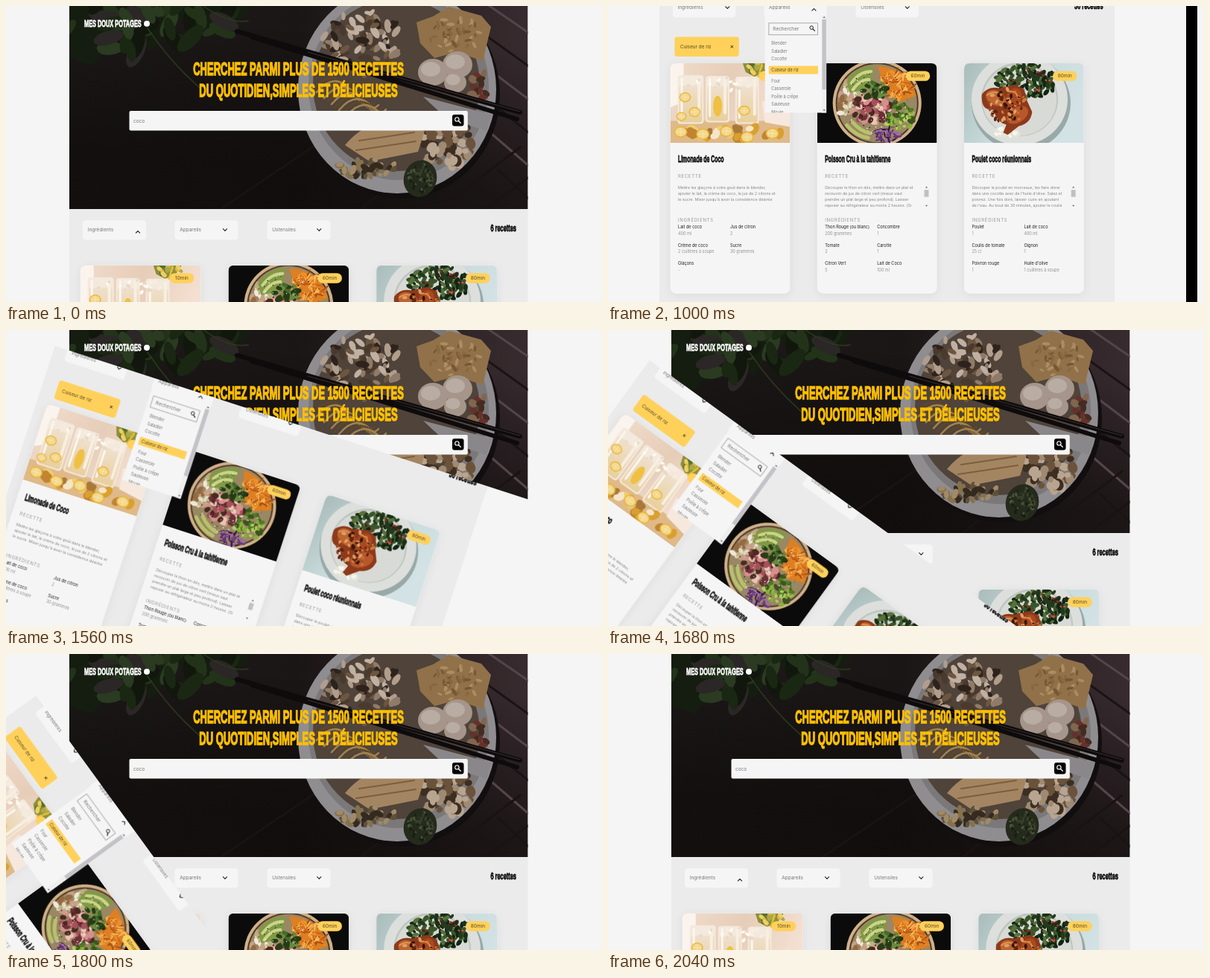
Recreate the animation shown at these times as an HTML page. Size 800 px wide and 398 px high, loop 2.1 s.

```html
<!DOCTYPE html>
<html lang="fr">
<head>
<meta charset="utf-8">
<title>Recettes</title>
<style>
  html, body { margin: 0; width: 100%; height: 100%; overflow: hidden; background: #f5f5f5; }
  #stage { display: block; width: 100vw; height: 100vh; }
  text { font-family: Inter, "Open Sans", sans-serif; white-space: pre; }
  .display { font-family: "Liberation Sans", sans-serif; font-weight: 700; stroke: currentColor; stroke-width: .06em; }
  .light { font-weight: 300; }
  .card { filter: drop-shadow(0 2px 6px #00000010); }
  .line { fill: none; stroke-linecap: round; stroke-linejoin: round; }

  .list, .sheet, .strip { animation: 2100ms step-end infinite; }
  .list { animation-name: showList; }
  .sheet { animation-name: showSheet, swing; }
  .strip { animation-name: showStrip; }
  @keyframes showList {
    0%, 100% { visibility: hidden; }
    23.809% { visibility: visible; }
    47.619% { visibility: hidden; }
  }
  @keyframes showSheet {
    0% { visibility: hidden; }
    47.619%, 100% { visibility: visible; }
  }
  @keyframes showStrip {
    0% { opacity: 1; }
    71.428%, 100% { opacity: 0; }
  }
  /* The sheet swings about its top left corner, 9 degrees every 60 ms. */
  @keyframes swing {
    0% { transform: rotate(0deg); }
    71.428% { transform: rotate(9deg); animation-timing-function: steps(10, end); }
    100% { transform: rotate(99deg); }
  }
</style>
</head>
<body>
<svg id="stage" viewBox="0 0 800 398"></svg>
<script>
const YELLOW = '#ffd15b', PAPER = '#f5f5f5', INK = '#1b1b1b', GREY = '#777';

let seed = 7;
const random = () => (seed = seed * 16807 % 2147483647) / 2147483647;

const text = (str, x, y, size, fill = GREY, attrs = '') =>
  `<text x="${x}" y="${y}" font-size="${size}" fill="${fill}" ${attrs}>${str}</text>`;
const display = (str, x, y, size, fill = '#111', anchor = 'start') =>
  `<text class="display" transform="translate(${x} ${y}) scale(.55 1)" font-size="${size}" fill="${fill}" color="${fill}" text-anchor="${anchor}">${str}</text>`;
const rect = (x, y, w, h, fill, r = 0, attrs = '') =>
  `<rect x="${x}" y="${y}" width="${w}" height="${h}" rx="${r}" fill="${fill}" ${attrs}/>`;
const oval = (x, y, rx, ry, fill, turn = 0) =>
  `<ellipse rx="${rx}" ry="${ry}" fill="${fill}" transform="translate(${x} ${y}) rotate(${turn})"/>`;
const shape = (d, fill) => `<path d="${d}" fill="${fill}"/>`;
const line = (d, stroke, width = 1) =>
  `<path class="line" d="${d}" stroke="${stroke}" stroke-width="${width}"/>`;
const at = (x, y, body, scale = 1) => `<g transform="translate(${x} ${y}) scale(${scale})">${body}</g>`;

// Small pieces strewn inside an ellipse.
const strew = (n, cx, cy, rx, ry, size, colors, slim = .6) =>
  Array.from({ length: n }, (_, i) => {
    const a = random() * 2 * Math.PI, d = Math.sqrt(random()), s = size * (.6 + .6 * random());
    return oval((cx + rx * d * Math.cos(a)).toFixed(1), (cy + ry * d * Math.sin(a)).toFixed(1),
      s.toFixed(1), (s * slim).toFixed(1), colors[i % colors.length], Math.round(random() * 180));
  }).join('');

const lens = (x, y, color, s = 1) => at(x, y,
  `<circle cx="-.8" cy="-.8" r="2.3" fill="none" stroke="${color}" stroke-width="1"/>` +
  line('M1 1L3.4 3.4', color, 1.2), s);
const chevron = (x, up) => at(x, up ? 30.8 : 28, line(up ? 'M-2.6 1.3L0-1.3 2.6 1.3' : 'M-2.6-1.3L0 1.3 2.6-1.3', '#222', 1.1));
const arrow = (x, y, dir) => shape(`M${x - 1.6} ${y + dir}h3.2l-1.6${dir > 0 ? '-' : ' '}2z`, '#666');

const glass = (x, y, w, h) =>
  rect(x, y, w, h, '#f3e9dc', 4) + rect(x + 2, y + 14, w - 4, h - 16, 'url(#drink)', 3) +
  rect(x + 4, y + 3, 3, h - 10, '#fbf6ee', 1.5) + rect(x + w - 8, y + 3, 4, h - 14, '#f8efe2', 2);
const slice = (x, y, r) => oval(x, y, r, r * .85, '#e9b53c') + oval(x, y, r * .82, r * .68, '#f3d88c') +
  line(`M${x - r * .6} ${y}h${r * 1.2}M${x} ${y - r * .5}v${r}`, '#f9e9bd', .7);

const lemonade = () =>
  rect(0, 0, 162, 108, 'url(#cream)') + shape('M0 0H18V52L0 60z', '#fbf4ee') +
  rect(0, 78, 162, 30, '#dfb988') +
  shape('M98 0H136L128 12 114 18 102 12z', '#8a8f3c') + strew(16, 118, 7, 17, 8, 5, ['#a9a84a', '#55702c', '#e2b93f', '#efcf62']) +
  line('M112 40L124 2', '#efbd30', 2.2) +
  glass(10, 16, 35, 66) + glass(48, 17, 32, 63) + glass(88, 18, 32, 64) +
  oval(64, 58, 6, 14, '#efc042') + slice(20, 46, 8) + slice(33, 66, 8) + slice(100, 64, 8) + slice(15, 72, 7) +
  strew(24, 63, 28, 52, 9, 3.5, ['#fffaf3', '#e9d9c8', '#f7ece0']) +
  strew(26, 80, 97, 78, 9, 8, ['#d99f2f', '#c18430', '#f0cd6b', '#f6e6c8', '#a9793a'], .7) +
  [[14, 93], [44, 96], [76, 92], [104, 100], [138, 95]].map(([x, y]) => slice(x, y, 9)).join('') +
  shape('M124 52Q146 44 162 56V86L128 80z', '#f6e8dc');

const fishBowl = () =>
  rect(0, 0, 162, 108, '#0c0b0b') + oval(81, 54, 60, 59, '#d0b188') + oval(81, 54, 56, 55, '#4d3b2b') +
  oval(81, 54, 54, 53, '#9a8763') +
  strew(45, 44, 52, 16, 28, 5, ['#e2d6bd', '#c79f86', '#f0e7d6', '#96693f', '#b7b481']) +
  shape('M40 24Q54 4 76 4L72 34 44 40z', '#7f9a45') + line('M46 27Q57 11 73 11M48 36Q58 22 70 22', '#cdd38a', 4) +
  shape('M82 4Q124 6 134 44L112 52 92 38z', '#dd7f22') + strew(75, 109, 29, 24, 20, 5, ['#f3a13a', '#cf6517', '#f7b95a', '#a84d12'], .2) +
  strew(60, 112, 72, 20, 20, 4, ['#86b03a', '#b0d060', '#527a26', '#39551c'], .65) +
  strew(60, 74, 62, 26, 20, 5, ['#a8505a', '#d88f8c', '#6f2f38', '#ecc3b6', '#4a2a22'], .75) +
  strew(35, 92, 97, 20, 9, 5, ['#673382', '#9b64ac', '#38193f'], .25) +
  line('M40 84Q53 99 69 101M48 80Q58 92 72 95', '#b6c269', 5) +
  strew(24, 76, 36, 17, 11, 6, ['#476b2b', '#223d18', '#2b3b17', '#6a8a3f']) +
  strew(110, 80, 54, 45, 44, .9, ['#f8f1df', '#1b1713'], .7);

const chicken = () =>
  rect(0, 0, 162, 108, 'url(#cloth)') + oval(77, 54, 67, 65, '#98a9a8') + oval(75, 49, 65, 62, '#dcdfdb') +
  oval(75, 49, 52, 50, '#bfc6c2') + oval(75, 50, 50, 48, '#d8dad5') +
  strew(120, 84, 24, 40, 23, 5, ['#23391d', '#39552a', '#122414', '#56713a', '#1b2f18'], .55) +
  strew(24, 84, 24, 36, 19, 2, ['#9c2a22', '#c9583c']) +
  strew(28, 58, 94, 15, 8, 4, ['#f7f6ef', '#e6e4d8']) +
  shape('M24 42Q33 30 48 34L68 29Q84 33 84 48L92 66Q90 82 74 85L59 97 53 94 57 83Q43 79 40 63 22 65 24 42z', '#8c3a1b') +
  oval(43, 47, 14, 10, '#bd6430', 25) + oval(67, 47, 10, 14, '#a8491e', 25) + oval(72, 70, 16, 10, '#b8582a', -32) +
  line('M31 43Q40 36 49 42M61 38Q71 37 73 47', '#dd9455', 2) +
  strew(70, 58, 58, 26, 23, 3, ['#5c2212', '#d07a3c', '#35150d', '#a5441d', '#e0a066']);

const hero = () =>
  rect(85, 0, 615.5, 273, 'url(#table)') + rect(85, 0, 615.5, 273, 'url(#dusk)') +
  [0, 1, 2, 3, 4, 5].map(i => line(`M${620 + i * 8} ${-20 + i * 48}L710 ${42 + i * 45}`, i % 2 ? '#1a1315' : '#54454a', 3)).join('') +
  line('M270 285L420 184M455 290L530 230M620 290L705 228M575 278L690 190', '#1a1214', 3) +
  shape('M85 0H330Q300 45 257 38L230 16 196 60 152 43 116 80 85 70z', '#151c10') +
  strew(46, 190, 22, 118, 40, 20, ['#1a2712', '#22331a', '#11170d', '#2a3b22', '#2b2726'], .45) +
  line('M190 30Q220 75 260 110M265 0Q300 25 325 20', '#2b391d', 1.5) +
  oval(530, 119, 133, 140, '#120e0f') + oval(525, 112, 133, 140, '#8f8d90') + oval(527, 108, 121, 126, '#7b787a') +
  oval(524, 106, 112, 116, '#4f433a') +
  strew(90, 478, 48, 52, 42, 8, ['#8f7b69', '#b09d8c', '#4a3a2d', '#6d563f', '#c0b0a2', '#2e231c'], .5) +
  Array.from({ length: 10 }, (_, i) => line(`M${412 + i * 5} ${112 + i * 4}q25-30 48 0t35 ${18 - i}`, i % 2 ? '#a08350' : '#5e4728', 2.5)).join('') +
  shape('M551 22L573 14 595 1 638 13 651 28 640 74 605 62 575 70 556 50z', '#917149') +
  strew(40, 602, 38, 34, 24, 5, ['#ac8d62', '#765834', '#88673f'], .4) +
  strew(14, 636, 107, 12, 18, 8, ['#68302a', '#81664f', '#452b20']) +
  shape('M560 122L652 146 645 168 590 150z', '#8a878a') +
  [[573, 89, 20], [606, 79, 20], [603, 103, 15]].map(([x, y, r]) => oval(x, y, r, r * .9, '#a5958a') + oval(x - 3, y - 4, r * .65, r * .5, '#b9aca2')).join('') +
  strew(70, 592, 184, 36, 32, 7, ['#a08a73', '#6b523a', '#b8a590', '#3d2e22'], .8) +
  shape('M455 187Q485 151 526 157L562 168 553 196 488 209z', '#a48562') + line('M470 194L550 182M474 181L548 170', '#7d5d3c', 2) +
  strew(40, 485, 218, 42, 12, 6, ['#5e5137', '#86714d', '#342a1e', '#a08a68']) +
  line('M310 34L690 143M330 42L686 152', '#0e0b0c', 6) + line('M405 62L690 142', '#39302f', 1) +
  oval(556, 232, 22, 25, '#252b1c', 20) + strew(60, 556, 231, 17, 20, 2.5, ['#4a5235', '#171d12', '#363f27']) +
  display('MES DOUX POTAGES', 105, 28.4, 13.4, '#fff') + oval(189, 23.7, 4, 4, '#fff') +
  display('CHERCHEZ PARMI PLUS DE 1500 RECETTES', 392.5, 93.4, 23.7, '#ffc000', 'middle') +
  display('DU QUOTIDIEN,SIMPLES ET DÉLICIEUSES', 392.5, 121.6, 23.7, '#ffc000', 'middle') +
  rect(165.5, 141, 454.3, 26.4, PAPER, 2) + text('coco', 171, 156.6, 6.5) +
  rect(599, 146, 15.5, 15.5, '#000', 3) + lens(606.3, 153.3, '#fff', 1.15);

const recipes = [
  { title: 'Limonade de Coco', time: '10min',
    steps: ['Mettre les glaçons à votre goût dans le blender,', 'ajouter le lait, la crème de coco, le jus de 2 citrons et', "le sucre. Mixer jusqu'à avoir la consistence désirée"],
    items: ['Lait de coco|400 ml', 'Jus de citron|2', 'Crème de coco|2 cuillères à soupe', 'Sucre|30 grammes', 'Glaçons|-'] },
  { title: 'Poisson Cru à la tahitienne', time: '60min',
    steps: ['Découper le thon en dés, mettre dans un plat et', 'recouvrir de jus de citron vert (mieux vaut', 'prendre un plat large et peu profond). Laisser', 'reposer au réfrigérateur au moins 2 heures. (Si'],
    items: ['Thon Rouge (ou blanc)|200 grammes', 'Concombre|1', 'Tomate|2', 'Carotte|1', 'Citron Vert|5', 'Lait de Coco|100 ml'] },
  { title: 'Poulet coco réunionnais', time: '80min',
    steps: ['Découper le poulet en morceaux, les faire dorer', "dans une cocotte avec de l'huile d'olive. Salez et", 'poivrez. Une fois doré, laisser cuire en ajoutant', "de l'eau. Au bout de 30 minutes, ajouter le coulis"],
    items: ['Poulet|1', 'Lait de coco|400 ml', 'Coulis de tomate|25 cl', 'Oignon|1', 'Poivron rouge|1', "Huile d'olive|1 cuillères à soupe"] },
];

const heading = (str, y) => text(str, 10.5, y, 6, GREY, 'class="light" letter-spacing=".8"');
const card = ({ title, time, steps, items }, i) =>
  rect(0, 0, 162, 312, PAPER, 8, 'class="card"') +
  `<g clip-path="url(#corners)"><use href="#photo${i}"/></g>` +
  rect(120, 10.5, 32.5, 13.5, YELLOW, 6.5) + text(time, 136.3, 19.6, 6.5, '#5a4a22', 'text-anchor="middle"') +
  display(title, 10.5, 133.8, 12.6) + heading('RECETTE', 155.5) +
  steps.map((s, n) => text(s, 10.5, 170.5 + n * 8, 5.4, '#666', 'class="light"')).join('') +
  (steps.length > 3 ? arrow(147.8, 168, .8) + rect(144.8, 171.5, 6, 9.5, '#c1c1c1') + arrow(147.8, 193, -.8) : '') +
  heading('INGRÉDIENTS', 215) +
  items.map((item, n) => {
    const [name, amount] = item.split('|'), x = n % 2 ? 81 : 10.5, y = 223.5 + (n >> 1) * 24.9;
    return text(name, x, y, 5.6, INK) + text(amount, x, y + 9, 5.6, GREY, 'class="light"');
  }).join('');

const menus = [['Ingrédients', 18, 92], ['Appareils', 141.5, 209], ['Ustensiles', 265.5, 335.3]];

function dropdown(x, { items, picked, thumb }) {
  let y = 37.4, last;
  const rows = items.map((item, n) => {
    const hit = picked.includes(item);
    if (n) y += hit || last ? 15 : 10.6;
    last = hit;
    return (hit ? rect(5.5, y - 5.5, 66.5, 11, YELLOW) : '') + text(item, 9, y + 2, 5.6, hit ? '#4d401f' : GREY);
  }).join('');
  return `<svg x="${x}" y="39" width="83.5" height="131.5">` + rect(0, 0, 83.5, 132, PAPER) +
    rect(5.5, 10, 66, 16, 'none', 0, 'stroke="#888" stroke-width=".7"') +
    text('Rechercher', 11, 20.4, 6.5) + lens(64, 17, '#222') + rows +
    rect(77, 0, 6.5, 132, '#eee') + arrow(80.3, 2.3, .8) + rect(77.5, 5, 5.5, thumb, '#c4c2c6') + arrow(80.3, 128, -.8) + '</svg>';
}

const tag = ([str, x, w]) => rect(x, 67.6, w, 26.8, YELLOW, 3.5) +
  text(str, x + 7.5, 83.4, 6.4, '#5a4a22') + at(x + w - 9.5, 81, line('M-1.4-1.4L1.4 1.4M1.4-1.4L-1.4 1.4', '#222', 1));

// Page origin: bottom left corner of the hero.
const page = ({ count, open, tags = [], list }) =>
  rect(0, 0, 615.5, 600, '#ebebeb') + '<use href="#hero" x="-85" y="-273"/>' +
  menus.map(([name, x, mark], i) => rect(x, 15.3, 85, 26, PAPER, 4) +
    text(name, x + 6.7, 30.4, 6.5, GREY) + chevron(mark, i === open)).join('') +
  display(`${count} recettes`, 600, 29.6, 13.5, '#111', 'end') + tags.map(tag).join('') +
  recipes.map((r, i) => at(14.7 + i * 198.7, tags.length ? 103.5 : 75.7, card(r, i))).join('') +
  (list ? dropdown(menus[open][1] + 1, list) : '');

const scene = (name, body) =>
  `<g class="${name}"><svg width="800" height="398">${rect(0, 0, 800, 398, PAPER)}${body}</svg></g>`;

const gradient = (id, dir, ...stops) => `<linearGradient id="${id}" ${dir}>` +
  stops.map((c, i) => `<stop offset="${i / (stops.length - 1)}" stop-color="${c}"/>`).join('') + '</linearGradient>';

document.getElementById('stage').innerHTML = '<defs>' +
  gradient('cream', 'x2="1" y2=".3"', '#f0dccb', '#e6cdb8', '#f4e0d2') +
  gradient('drink', 'x2="0" y2="1"', '#efe0cc', '#e8cf9c') +
  gradient('cloth', 'x2="1" y2=".4"', '#a9bcba', '#c8dadb', '#d3e2e5') +
  gradient('table', 'x2="1" y2="0"', '#1f1b1b', '#1b1616', '#382b2f') +
  gradient('dusk', 'x1=".5" y1=".1" x2=".35" y2=".8"', '#0000', '#0a080699') +
  '<clipPath id="corners"><path d="M0 108V8Q0 0 8 0H154Q162 0 162 8V108z"/></clipPath>' +
  '<clipPath id="band"><path d="M85 0h615.5v273h-615.5z"/></clipPath>' +
  [lemonade, fishBowl, chicken].map((draw, i) => `<g id="photo${i}">${draw()}</g>`).join('') +
  `<g id="hero" clip-path="url(#band)">${hero()}</g></defs>` +
  scene('home', at(85, 273, page({ count: 6, open: 0 }))) +
  scene('list', at(82, 14.5, page({
    count: 50, open: 0,
    tags: [['Crème de coco', 20.6, 91.4], ['Jus de citron', 118.5, 84.5]],
    list: {
      items: ['Lait de coco', 'Jus de citron', 'Crème de coco', 'Sucre', 'Glaçons', 'Thon Rouge (ou', 'blanc)', 'Concombre'],
      picked: ['Jus de citron', 'Crème de coco'], thumb: 11,
    },
  }))) +
  scene('sheet', at(69, -25.7, page({
    count: 50, open: 1,
    tags: [['Cuiseur de riz', 20.6, 87]],
    list: {
      items: ['Blender', 'Saladier', 'Cocotte', 'Cuiseur de riz', 'Four', 'Casserole', 'Poêle à crêpe', 'Sauteuse', 'Moule'],
      picked: ['Cuiseur de riz'], thumb: 95,
    },
  }), .9925) + rect(776, 0, 15, 398, '#000', 0, 'class="strip"'));
</script>
</body>
</html>
```
